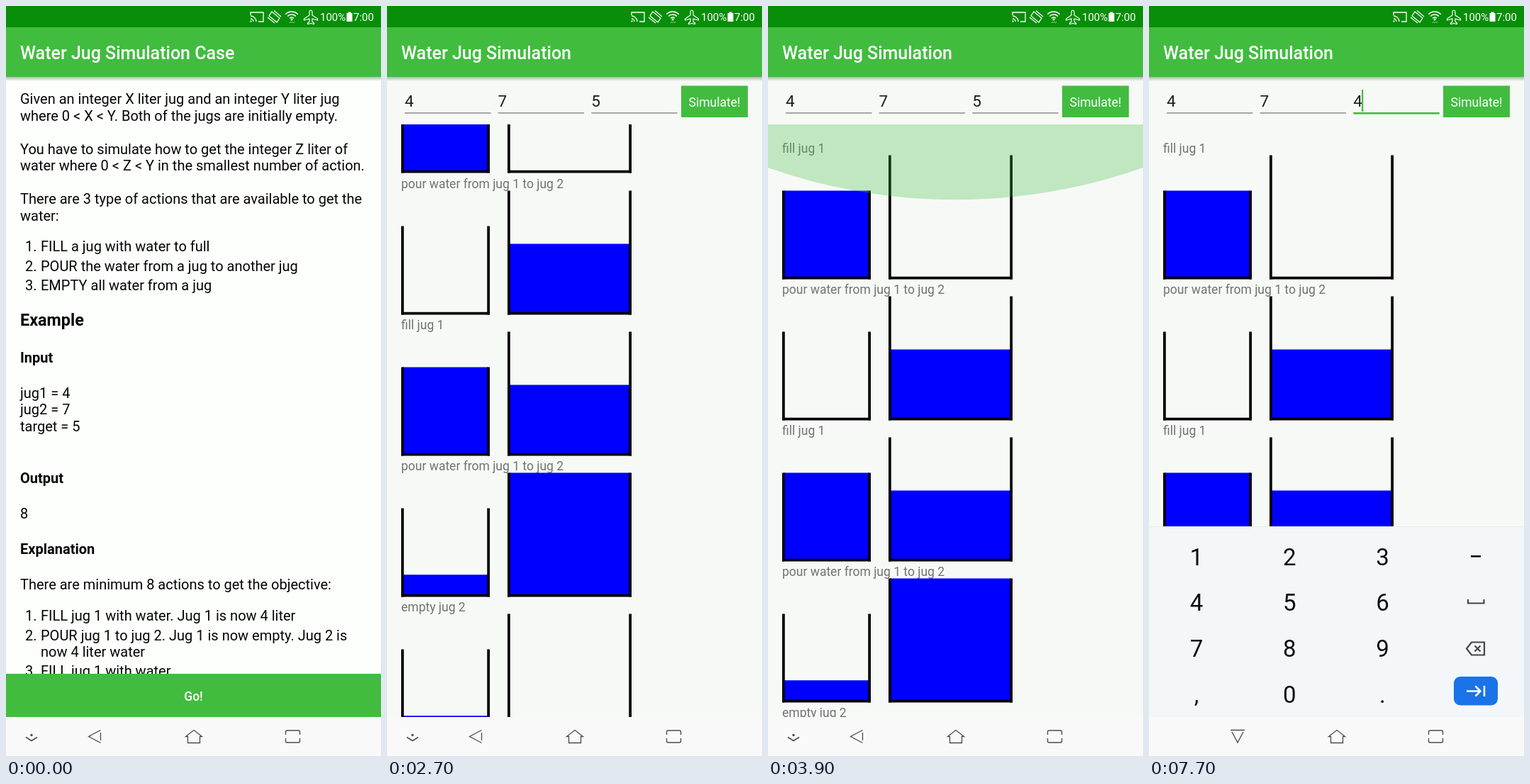
These frames come from a looping animation (529x1058 px, 8 s). An HTML page with a canvas:

```html
<!DOCTYPE html>
<html lang="en">
<head>
<meta charset="utf-8">
<title>Water Jug Simulation</title>
<style>
html, body { margin: 0; width: 100%; height: 100%; overflow: hidden; background: #f7f9f7; }
canvas { display: block; width: 100%; height: 100%; }
</style>
</head>
<body>
<canvas id="stage" width="529" height="1058"></canvas>
<script>
const c = document.getElementById('stage').getContext('2d');
const W = 529, H = 1058, LOOP = 8000, TICK = 100;
const GREEN = '#41bc3f', DARK = '#088e08', PAPER = '#f7f9f7', BLUE = '#0000ff';
const LIST_TOP = 167, NAV_TOP = 1003, KEYS_TOP = 735, ROW = 199.2, MAX_SCROLL = 797;

const clamp = v => Math.min(1, Math.max(0, v));
const between = (t, a, b) => t >= a && t < b;
const progress = (t, a, b) => clamp((t - a) / (b - a));

function rect(x, y, w, h, color) {
  c.fillStyle = color;
  c.fillRect(x, y, w, h);
}
function text(s, x, y, size, color = '#000', weight = 400, align = 'left') {
  c.font = `${weight} ${size}px Roboto, sans-serif`;
  c.textAlign = align;
  c.fillStyle = color;
  c.fillText(s, x, y);
}
function line(d, color, width) {
  c.strokeStyle = color;
  c.lineWidth = width;
  c.stroke(new Path2D(d));
}
function disc(x, y, r, color) {
  c.fillStyle = color;
  c.beginPath();
  c.arc(x, y, r, 0, 7);
  c.fill();
}
function clipped(x, y, w, h, draw) {
  c.save();
  c.beginPath();
  c.rect(x, y, w, h);
  c.clip();
  draw();
  c.restore();
}

function statusBar() {
  rect(0, 0, W, 30, DARK);
  line('M345 13V9H363V22H356M345 14a8 8 0 0 1 8 8M345 18a4 4 0 0 1 4 4', '#fff', 1.3);
  rect(344.5, 20.5, 2, 2, '#fff');
  line('M375 8L386 17L382 23L371 14ZM369 16L379 24M378 6.5L388 15', '#fff', 1.2);
  c.strokeStyle = '#fff';
  c.lineWidth = 1.5;
  for (const r of [4, 8, 12]) {
    c.beginPath();
    c.arc(403, 20, r, -Math.PI * .76, -Math.PI * .24);
    c.stroke();
  }
  disc(403, 19, 1.5, '#fff');
  line('M400 24l1.5-2 1.5 2M404 22l1.5 2 1.5-2', '#9fd29f', 1);
  line('M430 6q2 0 2 3v4l7.500 5v2l-7.500-2v4l2.500 2v1.500l-4.500-1-4.500 1v-1.500l2.500-2v-4' +
    'l-7.500 2v-2l7.500-5v-4q0-3 2-3z', '#fff', 1.2);
  text('100%', 443, 21, 15, '#fff');
  rect(480.500, 10, 8, 12, '#fff');
  rect(482.500, 8.500, 4, 2, '#fff');
  text('7:00', 490, 21, 15, '#fff');
}

function appBar(title) {
  const g = c.createLinearGradient(0, 100, 0, 106);
  g.addColorStop(0, 'rgba(0,0,0,.28)');
  g.addColorStop(1, 'rgba(0,0,0,0)');
  rect(0, 100, W, 6, g);
  rect(0, 30, W, 70, GREEN);
  text(title, 20, 74.500, 25, '#fff', 500);
}

function navBar(typing) {
  const ink = '#4b4b4b';
  rect(0, NAV_TOP, W, H - NAV_TOP, '#f8f9f8');
  if (typing) {
    line('M115 1021.500H135M117 1024L125 1039L133 1024', ink, 1.3);
  } else {
    line('M28 1031.500L36 1036.500L44 1031.500', ink, 1.5);
    disc(36, 1028.500, 1.7, ink);
    line('M133.500 1021.500L116.500 1030.500L133.500 1039.500M133.500 1025V1036', ink, 1.3);
  }
  line('M256.500 1030.500H253.500L265 1021.500L276.500 1030.500H273.500V1039.500H256.500Z', ink, 1.3);
  line('M394.500 1028V1024q0-2 2-2H412.500q2 0 2 2V1028M394.500 1033V1037q0 2 2 2H412.500q2 0 2-2V1033', ink, 1.4);
}

// [text, x, baseline, size, weight]
const INTRO = [
  ['Given an integer X liter jug and an integer Y liter jug', 20, 138],
  ['where 0 < X < Y. Both of the jugs are initially empty.', 20, 161.5],
  ['You have to simulate how to get the integer Z liter of', 20, 208.5],
  ['water where 0 < Z < Y in the smallest number of action.', 20, 232],
  ['There are 3 type of actions that are available to get the', 20, 279],
  ['water:', 20, 302.5],
  ['1.', 27, 346], ['FILL a jug with water to full', 49, 346],
  ['2.', 27, 373.5], ['POUR the water from a jug to another jug', 49, 373.5],
  ['3.', 27, 401], ['EMPTY all water from a jug', 49, 401],
  ['Example', 20, 451, 23.4, 700],
  ['Input', 20, 503, 20, 700],
  ['jug1 = 4', 20, 552.5], ['jug2 = 7', 20, 576], ['target = 5', 20, 599.5],
  ['Output', 20, 673, 20, 700],
  ['8', 20, 723],
  ['Explanation', 20, 773, 20, 700],
  ['There are minimum 8 actions to get the objective:', 20, 823],
  ['1.', 27, 867], ['FILL jug 1 with water. Jug 1 is now 4 liter', 49, 867],
  ['2.', 27, 894.5], ['POUR jug 1 to jug 2. Jug 1 is now empty. Jug 2 is', 49, 894.5],
  ['now 4 liter water', 49, 918],
  ['3.', 27, 945], ['FILL jug 1 with water', 49, 945]
];

function introPage(t) {
  rect(0, 0, W, H, '#fdfffd');
  for (const [s, x, y, size = 20, weight = 400] of INTRO) text(s, x, y, size, '#050505', weight);
  appBar('Water Jug Simulation Case');
  rect(0, 942, W, NAV_TOP - 942, GREEN);
  if (t >= 500) clipped(0, 942, W, NAV_TOP - 942, () =>
    disc(264.5, 973, 60 + 230 * progress(t, 500, 800), 'rgba(255,255,255,.22)'));
  text('Go!', 264.5, 980, 17.5, '#fff', 500, 'center');
}

const FILL = 'fill jug 1', POUR = 'pour water from jug 1 to jug 2';
const STEPS = [
  [FILL, 4, 0], [POUR, 0, 4], [FILL, 4, 4], [POUR, 1, 7],
  ['empty jug 2', 1, 0], [POUR, 0, 1], [FILL, 4, 1], [POUR, 0, 5]
];

function jug(x, bottom, size, level) {
  const y = bottom - size, b = 3.75;
  if (level) rect(x + 2, bottom - size * level, size - 4, size * level - 2, BLUE);
  rect(x, y, b, size, '#000');
  rect(x + size - b, y, b, size, '#000');
  rect(x, bottom - b, size, b, '#000');
}

function steps(scroll) {
  STEPS.forEach(([label, a, b], i) => {
    const y = Math.round(186.5 + i * ROW - scroll);
    text(label, 20, y + 19.500, 17.5, '#717271');
    jug(20, y + 198.500, 125, a / 4);
    jug(170, y + 198.500, 175, b / 7);
  });
}

// Overscroll arc, flattened vertically by s
function glow(edge, dir, s, alpha) {
  const r = W * 1.5, h = r * (1 - Math.cos(Math.PI / 6));
  c.fillStyle = `rgba(65,188,63,${alpha})`;
  c.beginPath();
  c.ellipse(W / 2, edge + dir * (h - r) * s, r, r * s, 0, 0, 7);
  c.fill();
}

function scrollAt(t) {
  if (t < 3600) return MAX_SCROLL * (1 - (1 - progress(t, 2600, 3400)) ** 1.55);
  return MAX_SCROLL * (1 - progress(t, 3500, 3800)) ** 1.2;
}

function form(t) {
  const focused = t >= 4600;
  const target = t < 5900 ? '5' : t < 6500 ? '' : '4';
  ['4', '7', target].forEach((s, i) => {
    const x = 25 + i * 131.6, active = focused && i === 2;
    text(s, x, 142, 22.5, '#1b1c1b');
    rect(x, active ? 150 : 150.3, 121.5, active ? 2.6 : 1.3, active ? GREEN : '#7d7e7d');
  });
  const blinkOn = between(t, 4700, 5200) || between(t, 5700, 7000) || t >= 7500;
  if (blinkOn) rect(target ? 300 : 288, 118, 2.2, 31, GREEN);
  rect(415, 112.5, 94, 44.5, GREEN);
  text('Simulate!', 462, 142, 17.5, '#fff', 400, 'center');
  if (between(t, 4700, 5900)) {
    disc(300.5, 166.3, 12.5, GREEN);
    c.beginPath();
    c.moveTo(300.5, 150.5);
    c.lineTo(309.5, 158);
    c.lineTo(291.500, 158);
    c.fill();
  }
}

function keyboard(t) {
  const ink = '#0b0c0d', icon = '#434649';
  rect(0, KEYS_TOP - 1, W, 1, '#e9ecec');
  rect(0, KEYS_TOP, W, NAV_TOP - KEYS_TOP, '#f4f7fa');
  if (between(t, 5800, 6100)) {
    const p = progress(t, 5700, 6100);
    disc(461, 906, 40 + 25 * p, `rgba(0,0,0,${.1 * (1 - p)})`);
  }
  if (between(t, 6500, 6600)) disc(67, 841, 40, 'rgba(0,0,0,.07)');
  ['123', '456', '789', ',0.'].forEach((row, j) => [...row].forEach((k, i) =>
    text(k, 67 + i * 131.2, 788.5 + j * 64.7, 33, ink, 400, 'center')));
  rect(454, 775, 14, 2.6, ink);
  line('M450 837V842.500H472.500V837', icon, 2.2);
  line('M455 897.500H473V915.500H455L448 906.500ZM459.500 902.500L467.500 910.500M467.500 902.500L459.500 910.500', icon, 2.2);
  c.fillStyle = '#1a73e8';
  c.beginPath();
  c.roundRect(430, 946, 62, 40.5, 9);
  c.fill();
  line('M448 966.500H467M460.500 959.500L467.500 966.500L460.500 973.500M473 959V974', '#fff', 2.5);
}

function simulationPage(t) {
  rect(0, 0, W, H, PAPER);
  clipped(0, LIST_TOP, W, NAV_TOP - LIST_TOP, () => {
    steps(scrollAt(t));
    if (between(t, 3400, 3600)) glow(NAV_TOP, -1, .13, .05);
    if (between(t, 3800, 3900)) glow(LIST_TOP, 1, .5, .2);
    if (between(t, 3900, 4300)) {
      const k = (1 - progress(t, 3900, 4300)) ** 2;
      glow(LIST_TOP, 1, k, .3 * k);
    }
  });
  appBar('Water Jug Simulation');
  form(t);
  if (t >= 5200) clipped(0, KEYS_TOP - 1, W, NAV_TOP - KEYS_TOP + 1, () => {
    const p = progress(t, 5100, 5300);
    c.globalAlpha = p;
    c.translate(0, 100 * (1 - p));
    keyboard(t);
  });
}

function draw(t) {
  c.clearRect(0, 0, W, H);
  if (t < 1300) introPage(t);
  if (t >= 800) {
    const p = progress(t, 700, 1300);
    c.save();
    c.globalAlpha = clamp(p * 1.8);
    c.translate(0, 85 * (1 - p) ** 3);
    simulationPage(t);
    c.restore();
  }
  statusBar();
  navBar(t >= 4800);
}

function frame(now) {
  draw(Math.floor(now % LOOP / TICK) * TICK);
  requestAnimationFrame(frame);
}
const start = performance.now();
requestAnimationFrame(function tick(now) {
  frame.last = now;
  draw(Math.floor(Math.max(0, now - start) % LOOP / TICK) * TICK);
  requestAnimationFrame(tick);
});
</script>
</body>
</html>
```
